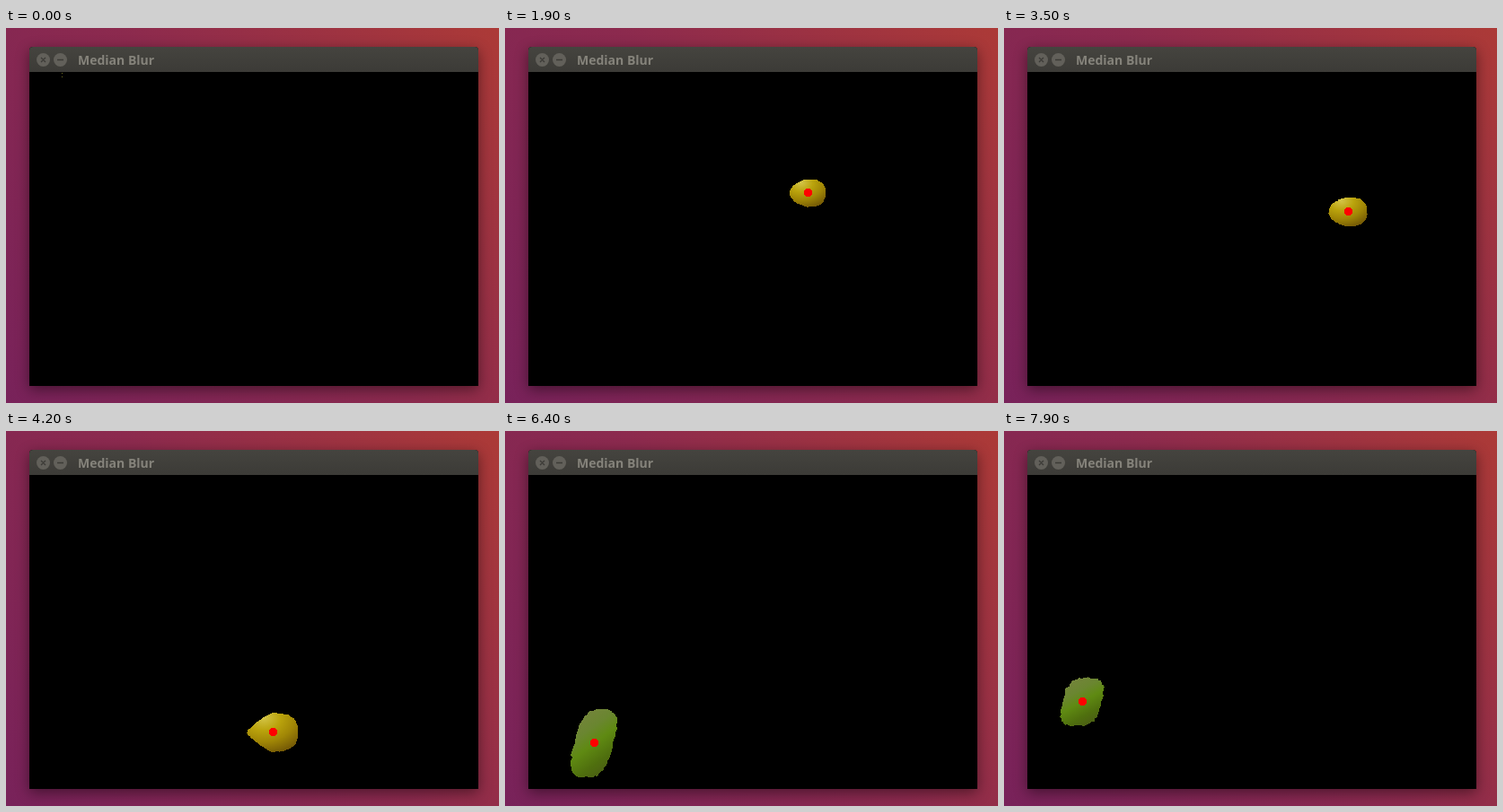
Write an HTML page that moves like this. It is 549 px wide and 418 px high and loops after 8000 ms.

```html
<!DOCTYPE html>
<html lang="en">
<head>
<meta charset="utf-8">
<title>Median Blur</title>
<style>
  html, body { margin: 0; width: 100%; height: 100%; overflow: hidden; }
  body { background: linear-gradient(52deg, #78225a, #8c2a4e 52%, #ac3a37); }
  .window {
    position: absolute; left: 26px; top: 21px; width: 500px; height: 378px;
    border-radius: 4px 4px 0 0; background: #000;
    box-shadow: 0 4px 15px rgba(0, 0, 0, .45);
  }
  .bar {
    height: 28px; border-radius: 4px 4px 0 0;
    background: linear-gradient(#45443f, #3c3b37);
  }
  svg { position: absolute; left: 0; top: 0; }
  .title { font: 700 14px "Noto Sans", "Open Sans", sans-serif; fill: #85837b; }
  .crisp { shape-rendering: crispEdges; }
</style>
</head>
<body>
<div class="window"><div class="bar"></div></div>
<svg width="549" height="418">
  <defs>
    <radialGradient id="yellow" cx=".32" cy=".12" r=".95">
      <stop offset="0" stop-color="#d4c548"/>
      <stop offset=".35" stop-color="#baa30c"/>
      <stop offset=".65" stop-color="#a08606"/>
      <stop offset="1" stop-color="#725706"/>
    </radialGradient>
    <linearGradient id="green" x1=".25" y1="0" x2=".75" y2="1">
      <stop offset="0" stop-color="#76843e"/>
      <stop offset=".3" stop-color="#6a8630"/>
      <stop offset=".5" stop-color="#5f8a12"/>
      <stop offset=".75" stop-color="#4f6f0e"/>
      <stop offset="1" stop-color="#4a5a16"/>
    </linearGradient>
  </defs>
  <g fill="#62605a">
    <circle cx="41.5" cy="35.5" r="7.5"/>
    <circle cx="60.5" cy="35.5" r="7.5"/>
  </g>
  <path d="M39 33l5 5m0-5l-5 5M57 35.5h7" stroke="#3c3b37" stroke-width="1.3"/>
  <text class="title" x="80" y="41">Median Blur</text>
  <g class="crisp">
    <path id="specks" d="M62 50h1v1h-1zM62 54h1v1h-1z" fill="#6d6a20"/>
    <g id="fruit">
      <path id="body"/>
      <circle cx=".5" cy=".5" r="4.9" fill="#f00"/>
    </g>
  </g>
</svg>
<script>
const LOOP = 8000, STEP = 100, EDGE_POINTS = 64;
const byId = id => document.getElementById(id);
const fruit = byId('fruit'), body = byId('body'), specks = byId('specks');

// Path points are evenly spaced by gap; the fruit is visible between from and to.
const lemon = {
  fill: 'url(#yellow)', rough: 0.5, power: 2.6, lean: 0,
  from: 700, to: 4900, origin: 500, gap: 400,
  path: [
    [195, 350], [235, 295], [313, 201], [380, 197], [272, 178], [169, 248],
    [272, 336], [361, 247], [386, 190], [326, 330], [196, 292], [147, 163]
  ],
  // It looks larger lower down, and its tip swings in and out of view.
  form(t, y) {
    const width = 20 + 0.11 * y;
    const turn = Math.cos((t - 1300) / 2900 * 2 * Math.PI);
    return { width, height: 0.77 * width, taper: 0.27 + 0.45 * Math.max(0, turn) };
  }
};
const lime = {
  fill: 'url(#green)', rough: 1, power: 3, lean: 0.23,
  from: 6400, to: 7900, origin: 6400, gap: 500,
  path: [[99, 347], [215, 205], [275, 225], [87, 301]],
  form(t) {
    const progress = (t - this.from) / (this.to - this.from);
    return { width: 44, height: 76 - 22 * progress, taper: 0 };
  }
};

const clamp = (v, lo, hi) => Math.max(lo, Math.min(hi, v));
const signedPow = (v, p) => Math.sign(v) * Math.abs(v) ** p;
const noise = n => {
  const v = Math.sin(n * 12.9898) * 43758.5453;
  return (v - Math.floor(v)) * 2 - 1;
};

function position({ path, origin, gap }, t) {
  const s = (t - origin) / gap, i = Math.floor(s), u = s - i;
  const [a, b, c, d] = [-1, 0, 1, 2].map(k => path[clamp(i + k, 0, path.length - 1)]);
  return [0, 1].map(k => Math.round(b[k] + u / 2 * (c[k] - a[k] +
    u * (2 * a[k] - 5 * b[k] + 4 * c[k] - d[k] + u * (3 * (b[k] - c[k]) + d[k] - a[k])))));
}

// A rough superellipse, narrowed towards the left and leaning to the right.
function outline(item, t, centerY) {
  const { width, height, taper } = item.form(t, centerY);
  const edge = [];
  for (let n = 0; n < EDGE_POINTS; n++) {
    const angle = n / EDGE_POINTS * 2 * Math.PI;
    const u = signedPow(Math.cos(angle), 2 / item.power);
    const v = signedPow(Math.sin(angle), 2 / item.power);
    const y = height / 2 * v * (1 - taper * Math.max(0, -u) ** 1.2);
    const x = width / 2 * u - item.lean * y;
    const jitter = k => item.rough * noise(n * 2 + k + t / STEP);
    edge.push([(x + jitter(0)).toFixed(1), (y + 1 + jitter(1)).toFixed(1)]);
  }
  return 'M' + edge.join('L') + 'Z';
}

function draw(time) {
  const t = Math.floor(time % LOOP / STEP) * STEP;
  const item = [lemon, lime].find(f => t >= f.from && t <= f.to);
  specks.style.display = t < lemon.from ? '' : 'none';
  fruit.style.display = item ? '' : 'none';
  if (!item) return;
  const [x, y] = position(item, t);
  fruit.setAttribute('transform', `translate(${x} ${y})`);
  body.setAttribute('d', outline(item, t, y));
  body.setAttribute('fill', item.fill);
}

const start = performance.now();
function tick() {
  draw(performance.now() - start);
  requestAnimationFrame(tick);
}
tick();
</script>
</body>
</html>
```
